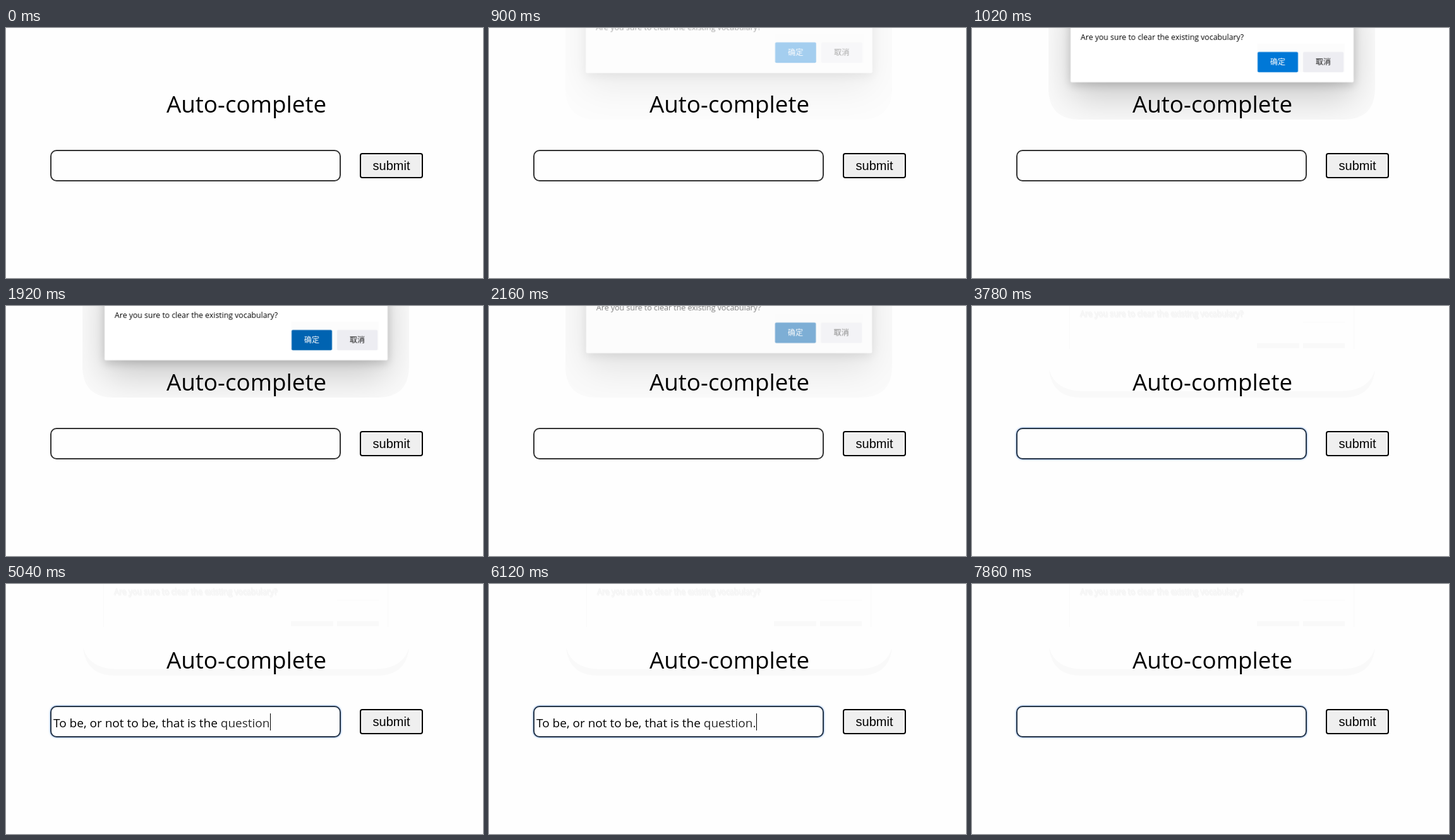
Animation of 755x396 px, one loop 8000 ms. Source, as an HTML page:

```html
<!DOCTYPE html>
<html lang="en">
<head>
<meta charset="utf-8">
<title>Auto-complete</title>
<style>
  html, body { margin: 0; width: 100%; height: 100%; overflow: hidden; background: #fefefe; }
  svg { display: block; width: 755px; height: 396px; }
  text { font-family: "Open Sans", "Noto Sans", sans-serif; white-space: pre; }
  .title { font-size: 36.8px; }
  .message { font-size: 12.3px; }
  .choice { font: 500 12px "Noto Sans CJK SC", "Noto Sans CJK", sans-serif; text-anchor: middle; }
  .typed { font-size: 19px; }
  .submit { font: 20px "Liberation Sans", Arial, sans-serif; text-anchor: middle; }
  .wide { filter: blur(28.8px); opacity: .19; }
  .near { filter: blur(7.2px); opacity: .18; }
  #glow { filter: blur(1.6px); }
  #dialog { transform-origin: 380px 60px; }
</style>
</head>
<body>
<svg viewBox="0 0 755 396">
  <defs>
    <path id="area" d="M121 0V95Q121 145 171 145H588Q638 145 638 95V0Z"/>
    <clipPath id="clip"><use href="#area"/></clipPath>
  </defs>

  <!-- faint trace left after the dialog closes -->
  <g id="trace" fill="#f9f9f9">
    <path d="M122 101Q127 145 172 145H588Q633 145 638 101Q628 135 583 135H177Q132 135 122 101Z"/>
    <g class="message" fill="#f6f6f6" stroke="#f6f6f6">
      <text x="171" y="16">Are you sure to clear the existing vocabulary?</text>
      <text x="172" y="18">Are you sure to clear the existing vocabulary?</text>
    </g>
    <path d="M451 59h67v8h-67zM524 59h66v8h-66zM524 25h66v1h-66zM154 0h1v68h-1zM604 0h1v68h-1z"/>
  </g>

  <g id="plate"><use href="#area" fill="#fafafa"/></g>
  <g clip-path="url(#clip)">
    <g id="dialog">
      <rect class="wide" x="156" y="-35" width="448" height="146.6"/>
      <rect class="near" x="156" y="-55" width="448" height="145.8"/>
      <rect x="156" y="-60" width="448" height="146" rx="2" fill="#fff"/>
      <rect x="452" y="25" width="138" height="45" fill="#fcfcfc"/>
      <text class="message" x="172" y="19">Are you sure to clear the existing vocabulary?</text>
      <rect id="ok" x="452" y="38" width="64" height="32" rx="2"/>
      <text class="choice" x="484" y="58" fill="#fff">确定</text>
      <rect x="524" y="38" width="64" height="32" rx="2" fill="#ededf2"/>
      <text class="choice" x="556" y="58" fill="#111">取消</text>
    </g>
  </g>

  <text class="title" x="254" y="134">Auto-complete</text>

  <rect id="glow" x="70" y="193" width="460" height="50" rx="10" fill="#5b93e6"/>
  <rect id="field" x="71" y="194" width="458" height="48" rx="9" fill="#fefefe" stroke-width="2"/>
  <text id="typed" class="typed" x="75" y="227"><tspan id="head">To be, or not to be, that is the</tspan><tspan fill="#2a2a2a"> question</tspan><tspan id="dot" fill="#2a2a2a">.</tspan></text>
  <rect id="caret" x="0" y="205" width="1" height="27"/>

  <rect x="561" y="199" width="98" height="38" rx="3" fill="#efefef" stroke="#000" stroke-width="2"/>
  <text class="submit" x="610" y="225">submit</text>
</svg>
<script>
  const LOOP = 8000;

  // Plays a table of [time, value] as hard steps; toStyle turns a value into CSS.
  function play(id, table, toStyle) {
    const frames = table.map(([time, value]) =>
      ({ offset: time / LOOP, easing: "step-end", ...toStyle(value) }));
    frames.push({ offset: 1, ...toStyle(table[table.length - 1][1]) });
    document.getElementById(id).animate(frames, { duration: LOOP, iterations: Infinity });
  }

  const opacity = value => ({ opacity: value });
  const fill = value => ({ fill: value });

  // Visible share of the dialog; it rises and grows slightly while hidden.
  const pose = shown => ({
    opacity: shown,
    transform: `translateY(${-23 * (1 - shown)}px) scale(${1 + 0.02 * (1 - shown)})`
  });

  // Caret x position, or null while hidden.
  const caret = x => ({
    opacity: x === null ? 0 : 1,
    transform: `translateX(${x ?? 0}px)`
  });

  const focus = [[0, 0], [3240, .35], [3300, .7], [3420, 1], [6540, .4],
                 [6660, 0], [7380, .35], [7440, .7], [7560, 1]];
  const border = level =>
    ({ stroke: `rgb(${51 - 12 * level}, ${51 + 3 * level}, ${51 + 21 * level})` });

  play("dialog", [[0, 0], [900, .35], [960, .75], [1020, 1], [2100, .85], [2160, .5], [2220, 0]], pose);
  play("plate", [[0, 0], [900, .5], [960, 1], [2220, 0]], opacity);
  play("trace", [[0, 0], [2220, 1]], opacity);
  play("ok", [[0, "#0078d7"], [1560, "#006cc1"], [1920, "#0063b1"]], fill);
  play("glow", focus, opacity);
  play("field", focus, border);
  play("typed", [[0, 0], [4020, 1], [6540, 0]], opacity);
  play("head", [[0, "#2a2a2a"], [4260, "#000"], [5100, "#2a2a2a"], [5340, "#000"]], fill);
  play("dot", [[0, "transparent"], [5100, "#2a2a2a"]], fill);
  play("caret", [[0, null], [3240, 75], [3780, null], [4020, 418], [4560, null], [5040, 418],
                 [5100, 423], [5580, null], [6120, 423], [6540, null], [7380, 75], [7860, null]], caret);
</script>
</body>
</html>
```
